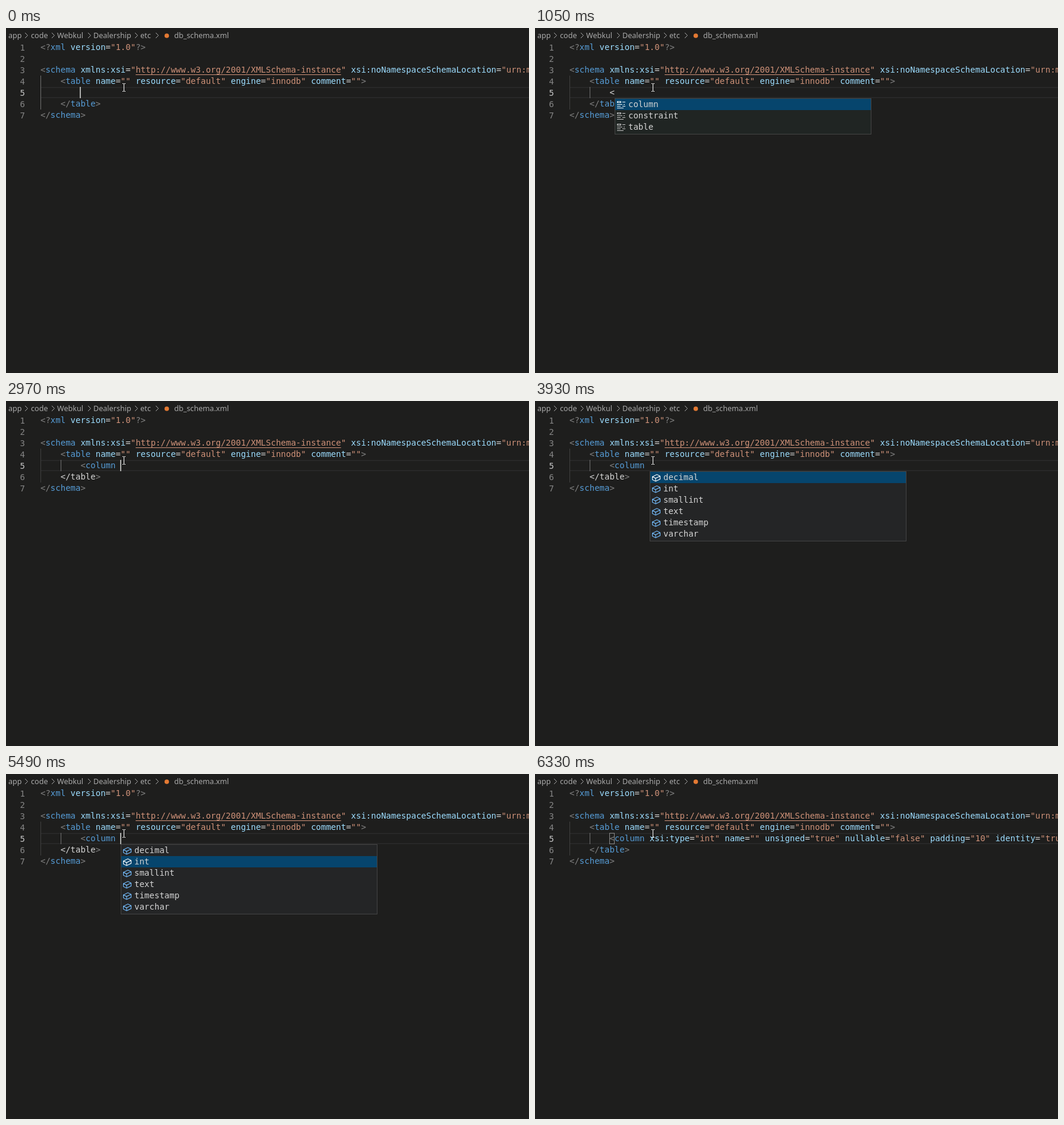
An HTML page with a canvas for the animation above (8 s loop, 880 px wide and 580 px high).

```html
<!DOCTYPE html>
<html lang="en">
<head>
<meta charset="utf-8">
<title>Schema autocompletion</title>
<style>
html, body { margin: 0; width: 100%; height: 100%; overflow: hidden; background: #1e1e1d; }
canvas { display: block; }
</style>
</head>
<body>
<canvas id="stage" width="880" height="580"></canvas>
<script>
const ctx = document.getElementById('stage').getContext('2d');
const LOOP = 8000, LEFT = 58, ROW = 19, FIRST = 23;
const MONO = '14px "DejaVu Sans Mono", monospace';
const SANS = '12.6px "Noto Sans", sans-serif';
const C = {
  back: '#1e1e1d', punct: '#808080', tag: '#569cd6', attr: '#9cdcfe',
  string: '#ce9178', plain: '#d4d4d4', crumb: '#a9a9a9'
};
const TOKENS = /(?<punct><[?\/]?|[?\/]?>)|(?<tag>(?<=[<?\/])\w+)|(?<string>"[^"]*"?)|(?<attr>[\w:]+)|(?<plain>=)/g;
const CRUMBS = [[4, 'app', 34], [42, 'code', 79], [86, 'Webkul', 140],
  [147, 'Dealership', 219], [226, 'etc', 254], [283, 'db_schema.xml']];
const ELEMENTS = ['column', 'constraint', 'table'];
const TYPES = ['decimal', 'int', 'smallint', 'text', 'timestamp', 'varchar'];
const COLUMN = '<column xsi:type="int" name="" unsigned="true" nullable="false" padding="10" identity="true"';
// Times at which the caret switches between on and off
const BLINKS = [1050, 1890, 2730, 2970, 3930, 4770, 5610];

ctx.font = MONO;
const CHAR = ctx.measureText('0').width;
const colX = col => LEFT + col * CHAR;
const rowY = line => FIRST + (line - 1) * ROW;

function rect(x, y, w, h, color) {
  ctx.fillStyle = color;
  ctx.fillRect(x, y, w, h);
}

function text(str, x, y, color, font = MONO) {
  ctx.font = font;
  ctx.fillStyle = color;
  ctx.fillText(str, x, y);
}

function path(points, color, width = 1) {
  ctx.strokeStyle = color;
  ctx.lineWidth = width;
  ctx.beginPath();
  points.forEach(([x, y]) => ctx.lineTo(x, y));
  ctx.stroke();
}

function code(line, col, str) {
  for (const m of str.matchAll(TOKENS)) {
    const kind = Object.keys(m.groups).find(k => m.groups[k] !== undefined);
    text(m[0], colX(col + m.index), rowY(line) + 14, C[kind]);
  }
}

function breadcrumbs() {
  for (const [x, label, arrow] of CRUMBS) {
    text(label, x, 17, C.crumb, SANS);
    if (arrow) path([[arrow - 2, 8], [arrow + 2.5, 12.5], [arrow - 2, 17]], C.crumb);
  }
  ctx.fillStyle = '#e37933';
  ctx.beginPath();
  ctx.arc(270.5, 13, 3.8, 0, 7);
  ctx.fill();
}

function keywordIcon(x, y, color) {
  ctx.strokeStyle = color;
  ctx.lineWidth = 1;
  ctx.strokeRect(x + 1.5, y + 2.5, 6, 2);
  for (const [dx, dy, w] of [[10, 3, 5], [1, 7, 9], [12, 7, 2], [1, 10, 6], [10, 10, 5], [1, 13, 11]])
    rect(x + dx, y + dy, w, 1, color);
}

function cubeIcon(x, y, color) {
  const at = pts => pts.map(([px, py]) => [x + px, y + py]);
  path(at([[1.5, 6.4], [9, 2.5], [14.5, 5.3], [14.5, 10.3], [7, 14], [1.5, 11.2], [1.5, 6.4],
    [7, 8.8], [14.5, 5.3]]), color, 1.1);
  path(at([[7, 8.8], [7, 14]]), color, 1.1);
}

function popup(x, items, selected, icon, back, iconColor) {
  const top = 118, height = items.length * ROW + 4;
  rect(x, top, 432, height, '#454545');
  rect(x + 1, top + 1, 430, height - 2, back);
  items.forEach((item, i) => {
    const y = top + 1 + i * ROW, active = i === selected;
    if (active) rect(x + 1, y, 430, ROW, '#06456d');
    icon(x + 3, y + 2, active ? '#ffffff' : iconColor);
    text(item, x + 23, y + 14, C.plain);
  });
}

function draw(t) {
  const typed = t >= 210, named = t >= 1890, spaced = t >= 2970, done = t >= 6210;
  rect(0, 0, 880, 580, C.back);
  breadcrumbs();

  // Current line and indent guides
  rect(LEFT, 99, 822, 2, '#282828');
  rect(LEFT, 116, 822, 2, '#282828');
  rect(LEFT, 80, 1, 57, typed ? '#404040' : '#707070');
  if (typed) rect(92, 99, 1, ROW, '#707070');

  for (let n = 1; n <= 7; n++)
    text(n, 32 - CHAR, rowY(n) + 15, n === 5 ? '#c6c6c6' : '#858585');

  code(1, 0, '<?xml version="1.0"?>');
  code(3, 0, '<schema xmlns:xsi="http://www.w3.org/2001/XMLSchema-instance" xsi:noNamespaceSchemaLocation="urn:m');
  rect(colX(19), 78, 41 * CHAR, 1, C.string);
  code(4, 4, '<table name="" resource="default" engine="innodb" comment="">');
  code(7, 0, '</schema>');

  if (done) code(5, 8, COLUMN);
  else if (named) code(5, 8, '<column');
  else if (typed) text('<', colX(8), rowY(5) + 14, C.plain);

  code(6, 4, '</table>');
  if (named && !done) {
    rect(colX(4), rowY(6), 7 * CHAR, ROW - 1, C.back);
    text('</table', colX(4), rowY(6) + 14, C.plain);
  }

  if (t >= 6330) {
    ctx.strokeStyle = '#888888';
    ctx.lineWidth = 1;
    ctx.strokeRect(125.5, 99.5, 8, 18);
  }

  const caretOn = BLINKS.filter(b => t >= b).length % 2 === 0;
  if (caretOn && !done) {
    const col = spaced ? 16 : named ? 15 : typed ? 9 : 8;
    rect(Math.floor(colX(col)) - (col === 8 ? 1 : 0), 99, 2, ROW, '#aeafad');
  }

  if (t >= 330 && !named) popup(134, ELEMENTS, 0, keywordIcon, '#202523', '#c5c5c5');
  if (t >= 3090 && !done) popup(193, TYPES, t >= 5490 ? 1 : 0, cubeIcon, '#242526', '#75beff');

  // Mouse pointer
  rect(198, 94, 1, 12, '#ffffff');
  rect(196, 93, 2, 1, '#ffffff');
  rect(199, 93, 2, 1, '#ffffff');
  rect(196, 106, 2, 1, '#ffffff');
  rect(199, 106, 2, 1, '#ffffff');
}

const start = performance.now();
function frame() {
  draw((performance.now() - start) % LOOP);
  requestAnimationFrame(frame);
}
frame();
</script>
</body>
</html>
```
